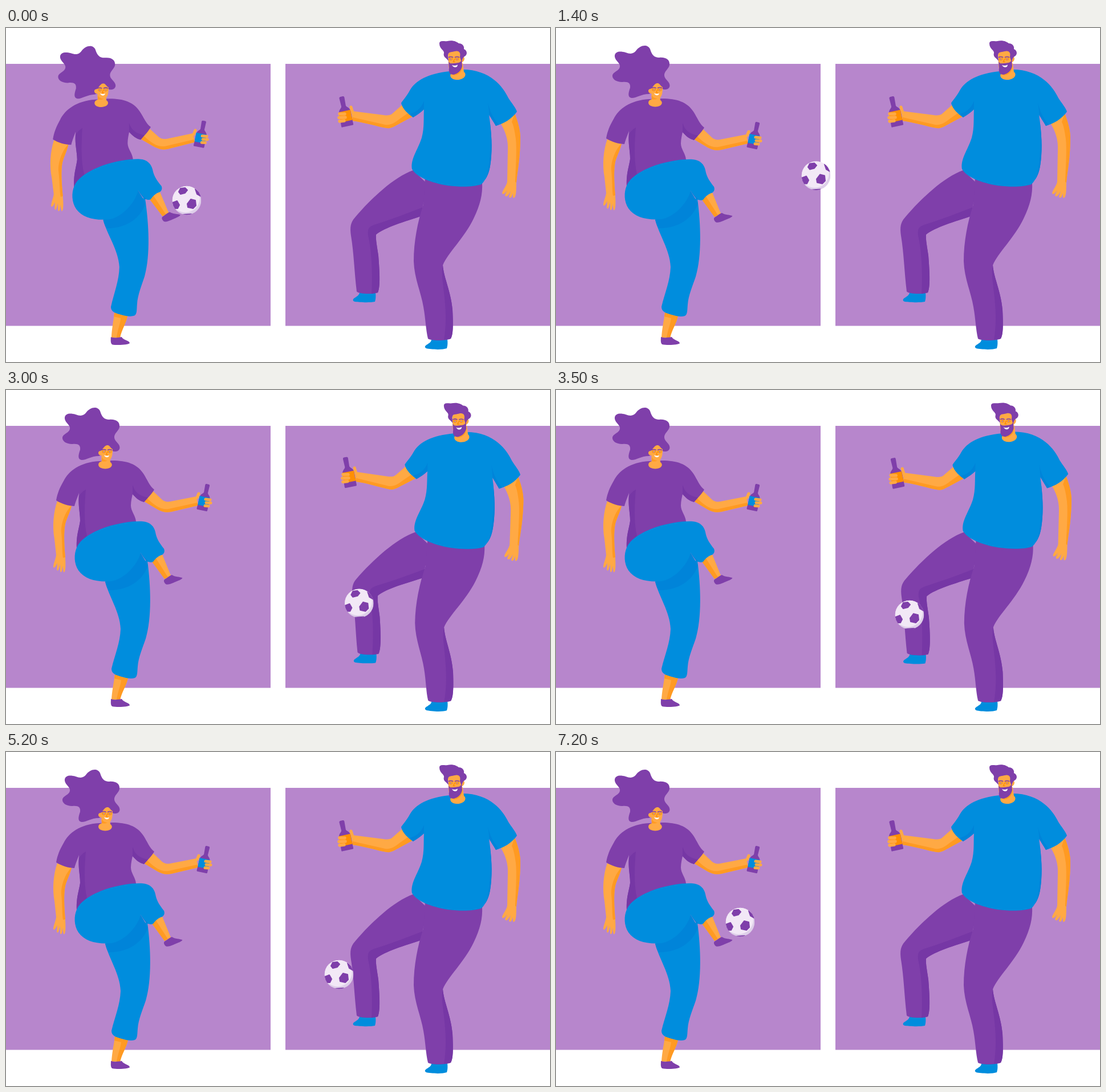
These frames come from a looping animation (954x587 px, 7300 ms). An HTML page with a canvas:

```html
<!DOCTYPE html>
<html lang="en">
<head>
<meta charset="utf-8">
<title>Kickabout</title>
<style>
  html, body { margin: 0; width: 100%; height: 100%; overflow: hidden; background: #fff; }
  canvas { display: block; width: 954px; height: 587px; }
</style>
</head>
<body>
<canvas id="stage" width="954" height="587"></canvas>
<script>
const ctx = document.getElementById('stage').getContext('2d');
const LOOP = 7300, STEP = 100;
const C = {
  panel: '#b786cc', purple: '#7f3faa', plum: '#7637a5', blue: '#008ddd', navy: '#0084d9',
  skin: '#ffa944', tan: '#ff9a22', orange: '#ff8f00', ball: '#f2e8f6', shade: '#decfe9'
};

const shape = (color, d) => ({ color, path: new Path2D(d) });
const paint = shapes => {
  for (const s of shapes) {
    ctx.fillStyle = s.color;
    ctx.fill(s.path);
  }
};
const stroke = (color, width, d) => {
  ctx.strokeStyle = color;
  ctx.lineWidth = width;
  ctx.lineCap = ctx.lineJoin = 'round';
  ctx.stroke(new Path2D(d));
};
const dot = (color, x, y, rx, ry = rx) => {
  ctx.fillStyle = color;
  ctx.beginPath();
  ctx.ellipse(x, y, rx, ry, 0, 0, 7);
  ctx.fill();
};
const posed = (x, y, angle, draw) => {
  ctx.save();
  ctx.translate(x, y);
  ctx.rotate(angle);
  ctx.translate(-x, -y);
  draw();
  ctx.restore();
};

const womanBack = [
  shape(C.purple, 'M165 37C168 47 172 52 181 52C193 51 200 56 199 65C198 72 189 76 190 84C191 91 200 94 199.5 102C198 109 190 109 186 107L163 116C150 116 141 123 133 123C125 122 127 114 130 105C131 96 126 94 116 95C106 95 98 90 99 83C101 76 113 75 112 66C111 60 102 56 103 48C105 40 114 41 122 43C130 46 136 46 141 39C147 31 160 27 165 37Z'),
  // hanging arm
  shape(C.skin, 'M90 195C83 215 81 240 85 262L88 290C87 298 83 305 83 311C84 314 87 311 90 304L89 316C91 319 92 318 95 306L95 319C97 322 99 318 99 309L101 320C104 322 105 312 104 297C102 270 101 250 104 235C107 224 112 216 115 203Z'),
  shape(C.tan, 'M115 203C104 213 96 235 97 250C99 270 98 285 100 295L104 294C102 270 101 250 104 235C107 224 112 216 115 203Z'),
  // bottle arm
  shape(C.skin, 'M257 177L274 193C278 196 282 197 288 196L334 187L337 203L290 214C280 216 274 214 266 210L241 195Z'),
  shape(C.tan, 'M241 195L248 191C262 204 272 211 285 209L335 198L336 203L290 214C280 216 274 214 266 210Z'),
  // standing foot
  shape(C.skin, 'M191 500L214 506C211 520 203 530 200 545L185 544C186 528 189 515 191 500Z'),
  shape(C.tan, 'M191 500L214 506C211 520 203 530 200 545L194 545C196 530 201 520 202 510L190 507Z'),
  shape(C.purple, 'M184 543C190 545 196 544 203 543C206 549 216 549 217 554C215 557 195 558 186 556C183 553 184 548 184 543Z'),
  // shirt
  shape(C.purple, 'M163 125C130 127 110 142 101 160C94 172 90 182 88 194C97 200 110 204 120 204C122 196 126 187 128 181C126 200 130 215 130 230C128 245 123 255 124 278L180 260L228 231C227 220 219 213 219 203C219 195 221 188 222 183C228 190 234 195 242 197C248 190 255 184 260 175C252 169 248 158 241 147C230 130 212 124 186 124Z'),
  shape(C.plum, 'M140 175C134 178 130 183 128 187C126 203 130 215 130 230C128 245 123 255 124 278L142 257C136 230 138 200 140 175ZM222 167C226 180 234 186 249 189L242 197C234 195 228 190 222 183Z'),
  // legs
  shape(C.blue, 'M174 337C180 362 200 390 201 420C200 445 191 465 185 490C185 499 193 501 203 504C213 507 220 508 226 506C231 503 230 495 231 486C232 470 240 452 245 437C256 400 254 345 248 300L200 300Z'),
  shape(C.navy, 'M174 337C176 345 178 349 180 352C215 352 240 335 249 308L236 286L190 325Z'),
  shape(C.skin, 'M254 299L274 289L289 326L278 332Z'),
  shape(C.tan, 'M254 299L263 296L284 329L278 332Z'),
  shape(C.purple, 'M278 333C283 330 287 326 291 325C297 329 304 328 309 330C311 332 300 336 293 339C288 341 283 343 280 341C277 338 276 335 278 333Z'),
  shape(C.blue, 'M124 277C130 262 150 250 175 241C200 233 225 230 240 231C253 232 260 240 262 250C264 262 270 270 277 279C279 284 277 288 273 290C268 291 262 296 258 302C254 304 248 302 245 299L236 286C230 310 205 333 185 336C160 338 138 333 127 317C119 305 119 288 124 277Z'),
  shape(C.navy, 'M236 286L245 299L247 302L250 301C244 296 241 291 236 286Z'),
  // head
  shape(C.skin, 'M167 118L182 118L183 127C188 130 187 138 174 138.5C162 138 160 131 164 127L168 125Z'),
  shape(C.tan, 'M168 117L183 117C180 124 176 127 168 125Z'),
  shape(C.skin, 'M166 107C171 103 173 97 178 97C182 97 183 102 187 104C187 113 186 124 178 124C172 124 168 120 167 115C161 115 160 107 166 107Z'),
  shape('#fff', 'M172 114.5C175 116 178 116 181 115C180 119.5 174 119.5 172 114.5Z')
];

const manBack = [
  // feet
  shape(C.blue, 'M620 465L648 465C649 473 648 478 647 481C637 483 620 482 612 481C607 480 608 476 612 474C616 471 619 470 620 465ZM746 547L774 547C775 555 774 560 773 563C765 566 745 565 737 563C733 561 735 558 739 556C743 553 746 552 746 547Z'),
  // legs
  shape(C.purple, 'M714 250C680 262 640 300 612 333C604 342 603 350 605 365C610 395 611 430 615 463C618 468 645 468 652 465C657 455 655 425 653 400C651 385 648 372 649 363C665 350 700 340 727 331L740 275Z'),
  shape(C.plum, 'M727 331C700 340 665 350 649 363C648 372 651 385 653 400C655 425 657 455 652 465L641 467C643 430 641 390 635 365C634 352 636 350 645 346C680 335 705 325 731 315Z'),
  shape(C.purple, 'M735 262L732 310C722 340 715 375 715 410C716 440 728 465 732 490C736 512 736 530 740 546C745 550 772 550 780 546C785 538 784 515 783 495C780 462 768 440 766 417C775 395 803 370 820 335C832 310 836 292 835 272Z'),
  shape(C.plum, 'M766 417C768 440 780 462 783 495C784 515 785 538 780 546L768 548C773 520 771 490 768 465C766 445 763 430 766 417Z'),
  // bottle arm
  shape(C.skin, 'M696 134L678 150C674 154 668 154 662 153L607 146L607 163C630 166 650 173 668 176C676 177 682 172 690 168L714 155Z'),
  shape(C.tan, 'M704 150L690 160C680 168 674 171 665 170L608 157L607 163C630 166 650 173 668 176C676 177 682 172 690 168L714 155Z'),
  // hanging arm
  shape(C.skin, 'M866 165C876 182 881 196 880 215L879 270C878 277 871 285 870 290C871 294 875 291 879 285L875 294C877 298 880 296 885 287L882 297C884 300 887 298 889 290L889 298C893 300 895 295 895 272C897 250 902 230 902 190C901 175 897 163 892 150Z'),
  shape(C.tan, 'M892 150C897 163 901 175 902 190C902 230 897 250 895 272L893 270C894 240 896 215 894 195C892 180 890 171 887 165Z'),
  // shirt
  shape(C.blue, 'M779 76C740 80 718 92 708 110C702 121 695 128 693 132C695 142 706 152 714 157C722 152 728 148 733 143C732 158 734 175 729 193C722 215 709 230 712 248C720 262 745 272 775 277C800 280 820 279 833 275C846 262 849 250 851 225C853 200 850 175 847 152C851 160 857 167 859 172C873 168 887 160 896 147C894 140 886 131 881 123C872 104 850 73 800 73Z'),
  shape(C.navy, 'M845 130C851 175 850 220 847 238C845 255 841 270 833 275C846 262 849 250 851 225C853 200 850 175 847 152L859 172L864 170C853 157 848 145 845 130ZM733 128C728 142 718 149 707 151L714 157C722 152 728 148 733 143Z'),
  // head
  shape(C.skin, 'M783 68L801 62L803 77C808 81 806 89 794 91C782 92 776 85 781 79Z'),
  shape(C.tan, 'M800 66C801 76 794 83 785 83L783 78Z'),
  shape(C.skin, 'M775 46C780 37 796 37 798 46L799 51C805 48 806 57 800 60C799 74 792 80 786 80C778 80 776 72 776 62Z'),
  shape(C.purple, 'M776 58C778 64 782 62 786 62C792 61 797 62 799 56L800 67C798 75 793 80 785 82C778 82 776 78 777 70Z'),
  shape(C.purple, 'M760 27C761 21 768 24 774 23C784 21 790 24 794 27C801 27 804 33 803 37C810 40 809 48 804 50C801 52 800 55 799 60L796 51C798 43 794 39 787 41C780 43 776 41 775 48L776 58C772 52 766 51 768 44C769 39 760 37 760 27Z'),
  shape('#fff', 'M782 65C785 67 789 66 792 64.5C792 70 785 71 782 65Z')
];

function bottle(x, y, angle, scale, label) {
  ctx.save();
  ctx.translate(x, y);
  ctx.rotate(angle);
  ctx.scale(scale, scale);
  paint([
    shape(C.purple, 'M-9 0Q-10 0-10-2L-9-22C-9-28-4-29-3.5-32L-4-45Q-4-47-2-47L2-47Q4-47 4-45L3.5-32C4-29 9-28 9-22L9-2Q9 0 8 0Z'),
    shape(label, 'M-9.5-24L9-24L9-8L-9.5-8Z')
  ]);
  ctx.restore();
}

function eyes(x, y, gap) {
  for (const cx of [x, x + gap]) {
    dot(C.orange, cx, y, 3.2, 2.3);
    dot('#fff', cx, y, 1.6, 1);
    dot(C.plum, cx, y, 0.9);
    stroke(C.purple, 1.6, `M${cx - 3.5} ${y - 3}Q${cx} ${y - 5} ${cx + 3.5} ${y - 3}`);
  }
  const nose = x + gap / 2;
  stroke(C.orange, 1.6, `M${nose + 1} ${y}L${nose - 1} ${y + 5}L${nose + 1.5} ${y + 5}`);
}

function drawWoman() {
  paint(womanBack);
  eyes(171.5, 108.5, 10.5);
  stroke(C.skin, 5, 'M335 189L338 182');
  bottle(344, 211.5, 0.207, 1, C.blue);
  stroke(C.skin, 5, 'M350 192L358 193M351 198L359 198.5M349 203.5L355 204');
}

function drawMan() {
  paint(manBack);
  eyes(780, 54.5, 11);
  stroke(C.skin, 5, 'M609 152L605 139');
  bottle(599.5, 172.5, -0.21, 1.13, C.orange);
  stroke(C.skin, 5.4, 'M585 151L594 151M584 157.5L595 157M585 164L593 163');
}

const patches = new Path2D(
  'M-14-15L-11-21L-3-22L1-18L-3-13L-11-11ZM15-20L24-12L25-7L18-11Z' +
  'M-25 4L-17 1L-13 8L-16 14L-23 14ZM1 6L7-2L15 0L16 9L11 14L2 12ZM-7 25L8 24L4 28L-4 28Z');

function drawBall(x, y) {
  const r = 25.3;
  ctx.save();
  ctx.translate(x, y);
  ctx.beginPath();
  ctx.arc(0, 0, r, 0, 7);
  ctx.clip();
  ctx.fillStyle = C.shade;
  ctx.fillRect(-r, -r, 2 * r, 2 * r);
  dot(C.ball, -2.5, -4, r);
  ctx.fillStyle = C.purple;
  ctx.fill(patches);
  ctx.strokeStyle = C.purple;
  ctx.lineWidth = 2;
  ctx.lineJoin = 'round';
  ctx.stroke(patches);
  ctx.restore();
}

// time, x, y of the ball, without the bounces on the man's foot
const flight = [
  [-100, 323, 299], [0, 317, 303], [200, 314, 305], [350, 316, 303], [800, 357, 268], [1150, 405, 249],
  [1400, 456, 259.5], [1600, 500, 288], [2000, 567, 369], [2300, 604, 427], [2400, 611, 438],
  [2550, 617, 441], [3500, 620, 438], [4300, 618, 437], [4700, 616, 437], [4800, 613, 434],
  [5200, 584, 391], [5600, 535, 328], [6000, 475.5, 286], [6400, 411.5, 270],
  [6800, 358, 277], [7200, 323, 299], [7300, 317, 303], [7500, 314, 305]
];
// start, duration and height of each bounce; the man sways with them
const bounces = [[2430, 900, 70], [3330, 900, 70], [4280, 460, 35]];

function along(keys, t) {
  const i = Math.max(1, keys.findIndex(k => k[0] > t) - 1);
  const [p, a, b, n] = [keys[i - 1], keys[i], keys[i + 1], keys[i + 2] || keys[i + 1]];
  const span = b[0] - a[0], u = (t - a[0]) / span;
  const axis = k => {
    const m0 = (b[k] - p[k]) / (b[0] - p[0]) * span;
    const m1 = (n[k] - a[k]) / (n[0] - a[0]) * span;
    return a[k] + u * (m0 + u * (3 * (b[k] - a[k]) - 2 * m0 - m1 + u * (2 * (a[k] - b[k]) + m0 + m1)));
  };
  return [axis(1), axis(2)];
}

function draw(t) {
  ctx.fillStyle = '#fff';
  ctx.fillRect(0, 0, 954, 587);
  ctx.fillStyle = C.panel;
  ctx.fillRect(0, 63, 464, 460.5);
  ctx.fillRect(490, 63, 464, 460.5);

  let sway = 0, lift = 0;
  for (const [start, time, height] of bounces) {
    const u = (t - start) / time;
    if (u > 0 && u < 1) {
      sway = Math.sin(Math.PI * u) ** 2;
      lift = 4 * height * u * (1 - u);
    }
  }
  const lean = t < 1000 ? (1 + Math.cos(Math.PI * t / 1000)) / 2 : 0;
  posed(200, 556, -0.016 * lean, drawWoman);
  posed(757, 563, 0.0175 * sway, drawMan);
  const [x, y] = along(flight, t);
  drawBall(x, y - lift);
}

const begin = performance.now();
function tick() {
  const t = (performance.now() - begin) % LOOP;
  draw(Math.floor(t / STEP) * STEP);
  requestAnimationFrame(tick);
}
tick();
</script>
</body>
</html>
```
